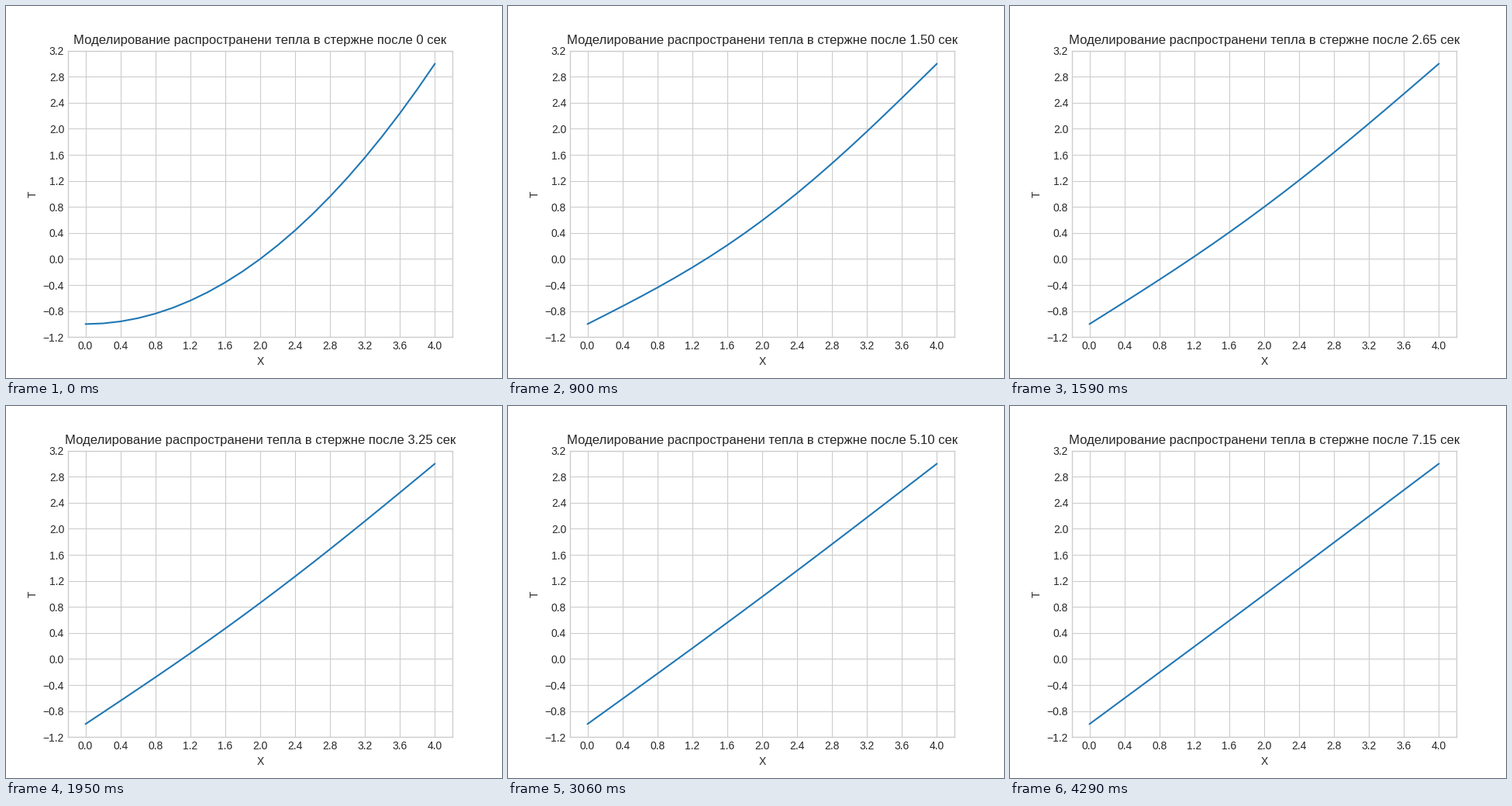
These frames come from a looping animation (640x480 px, 4320 ms). A matplotlib script:

```python
import numpy as np
import matplotlib.pyplot as plt
from matplotlib.animation import FuncAnimation

plt.style.use("seaborn-v0_8-whitegrid")
plt.rcParams["font.family"] = "Liberation Sans"

FRAMES = 144
INTERVAL = 30      # ms
DT = 0.05          # simulated seconds per frame
SUBSTEPS = 5
H = 0.2            # grid spacing along the rod


def simulate():
    """Explicit heat equation with fixed end temperatures."""
    x = np.linspace(0, 4, 21)
    temp = x**2 / 4 - 1
    r = DT / SUBSTEPS / H**2
    history = [temp.copy()]
    for _ in range(FRAMES - 1):
        for _ in range(SUBSTEPS):
            temp[1:-1] += r * np.diff(temp, 2)
        history.append(temp.copy())
    return x, history


x, history = simulate()

fig, ax = plt.subplots(figsize=(6.4, 4.8), dpi=100)
line, = ax.plot(x, history[0], color="#1f77b4", lw=1.5)
ax.set(xlim=(-0.2, 4.2), ylim=(-1.2, 3.2), xlabel="X", ylabel="T")
ax.set_xticks(np.arange(11) * 0.4)
ax.set_yticks(np.arange(-3, 9) * 0.4)
ax.xaxis.set_major_formatter("{x:.1f}")
ax.yaxis.set_major_formatter(lambda v, _: f"{v:.1f}".replace("-", "\u2212"))
title = ax.set_title("")


def update(i):
    seconds = f"{i * DT:.2f}" if i else "0"
    title.set_text(
        f"Моделирование распространени тепла в стержне после {seconds} сек")
    line.set_ydata(history[i])
    return line, title


anim = FuncAnimation(fig, update, frames=FRAMES, interval=INTERVAL,
                     repeat=True, repeat_delay=0)
plt.show()
```
